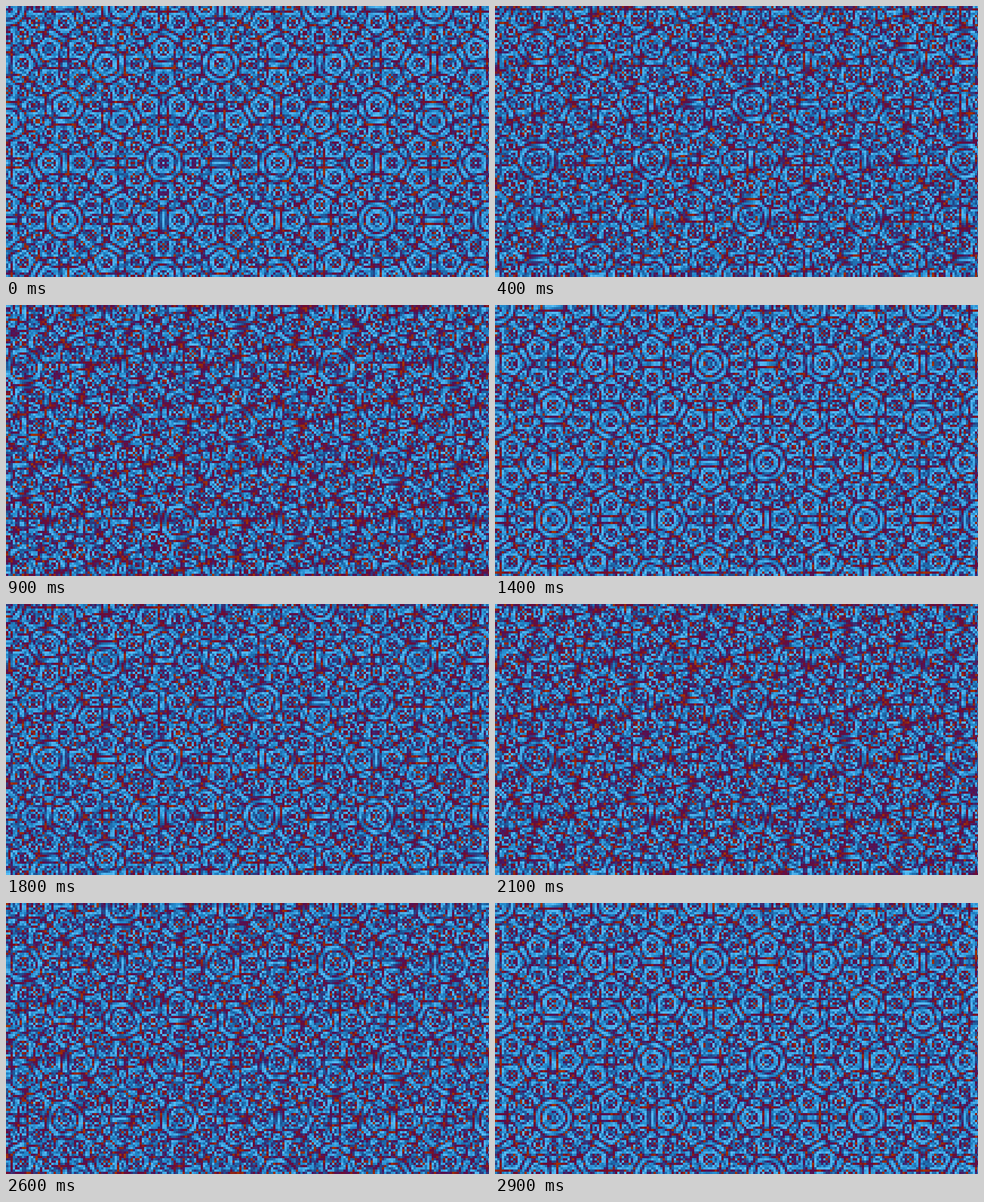
An HTML page with a canvas for the animation above (3 s loop, 640x360 px).

```html
<!DOCTYPE html>
<html>
<head>
<meta charset="utf-8">
<title>Quasicrystal</title>
<style>
  html, body { margin: 0; width: 640px; height: 360px; overflow: hidden; background: #1f4f8f; }
  canvas { display: block; width: 642px; height: 360px; image-rendering: pixelated; }
</style>
</head>
<body>
<canvas id="stage" width="214" height="120"></canvas>
<script>
const WAVES = 6, STEP = 100, STEPS = 30;
const canvas = document.getElementById('stage');
const ctx = canvas.getContext('2d');
const { width, height } = canvas;
const image = ctx.createImageData(width, height);
const pixels = new Uint32Array(image.data.buffer);

// position, red, green, blue
const stops = [
  [0, 86, 188, 246],
  [0.25, 34, 136, 203],
  [0.5, 30, 82, 146],
  [0.72, 80, 18, 90],
  [0.88, 112, 12, 48],
  [1, 160, 52, 0]
];

function colorAt(v) {
  const i = Math.max(1, stops.findIndex(stop => v <= stop[0]));
  const a = stops[i - 1], b = stops[i];
  const mix = (v - a[0]) / (b[0] - a[0]);
  const [r, g, bl] = [1, 2, 3].map(c => Math.round(a[c] + (b[c] - a[c]) * mix));
  return (255 << 24 | bl << 16 | g << 8 | r) >>> 0;
}
const palette = Array.from({ length: 256 }, (_, i) => colorAt(i / 255));

const directions = Array.from({ length: WAVES }, (_, i) => {
  const angle = i * Math.PI / WAVES;
  return [Math.cos(angle), Math.sin(angle)];
});

function draw(phase) {
  for (let y = 0, p = 0; y < height; y++) {
    for (let x = 0; x < width; x++, p++) {
      let sum = 0;
      for (const [dx, dy] of directions) sum += (Math.cos(x * dx + y * dy + phase) + 1) / 2;
      // fold the sum back and forth into 0..1
      const folded = 1 - Math.abs(((sum % 2) + 2) % 2 - 1);
      pixels[p] = palette[Math.round(folded * 255)];
    }
  }
  ctx.putImageData(image, 0, 0);
}

let shown = -1;
function tick() {
  const step = Math.floor(performance.now() / STEP) % STEPS;
  if (step !== shown) {
    shown = step;
    draw(step / STEPS * 2 * Math.PI);
  }
  requestAnimationFrame(tick);
}
tick();
</script>
</body>
</html>
```
